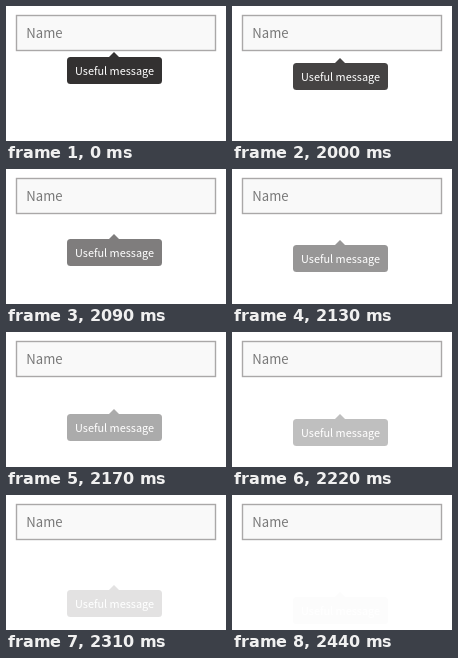
These frames come from a looping animation (220x135 px, 4440 ms). An HTML page:

```html
<!DOCTYPE html>
<html lang="en">
<head>
<meta charset="utf-8">
<title>Tooltip</title>
<style>
  html, body { margin: 0; width: 100%; height: 100%; overflow: hidden; background: #fff; }
  svg { display: block; width: 220px; height: 135px; }
  text { font-family: "Noto Sans CJK JP", "Noto Sans CJK SC", "Noto Sans CJK", "Noto Sans", sans-serif; }
  .field { fill: #f9f9f9; stroke: #aaa8a8; stroke-width: 1.4; }
  .label { font-size: 13.1px; fill: #777; }
  .tip { animation: drop 4440ms step-end infinite; }
  .bubble { fill: #333131; }
  .message { font-size: 10.9px; fill: #fff; }

  /* the tip falls and fades in ten short steps, then stays away */
  @keyframes drop {
    0%       { transform: translateY(0);      opacity: 1; }
    45.045%  { transform: translateY(6px);    opacity: .91; }
    45.946%  { transform: translateY(13px);   opacity: .76; }
    47.072%  { transform: translateY(19px);   opacity: .63; }
    47.973%  { transform: translateY(25px);   opacity: .51; }
    48.874%  { transform: translateY(31px);   opacity: .41; }
    50%      { transform: translateY(36px);   opacity: .31; }
    50.901%  { transform: translateY(40.5px); opacity: .22; }
    52.027%  { transform: translateY(44px);   opacity: .14; }
    52.928%  { transform: translateY(47px);   opacity: .08; }
    54.054%  { transform: translateY(49.5px); opacity: .04; }
    54.955%, 100% { transform: translateY(51px); opacity: .012; }
  }
</style>
</head>
<body>
<svg viewBox="0 0 220 135">
  <rect class="field" x="10.5" y="9.5" width="199" height="35"/>
  <text class="label" x="20.3" y="32">Name</text>
  <g class="tip">
    <path class="bubble" d="M102.5 51.5 L108 46 L113.5 51.5 Z"/>
    <rect class="bubble" x="61" y="51" width="95" height="27" rx="3.5"/>
    <text class="message" x="69" y="69">Useful message</text>
  </g>
</svg>
</body>
</html>
```
